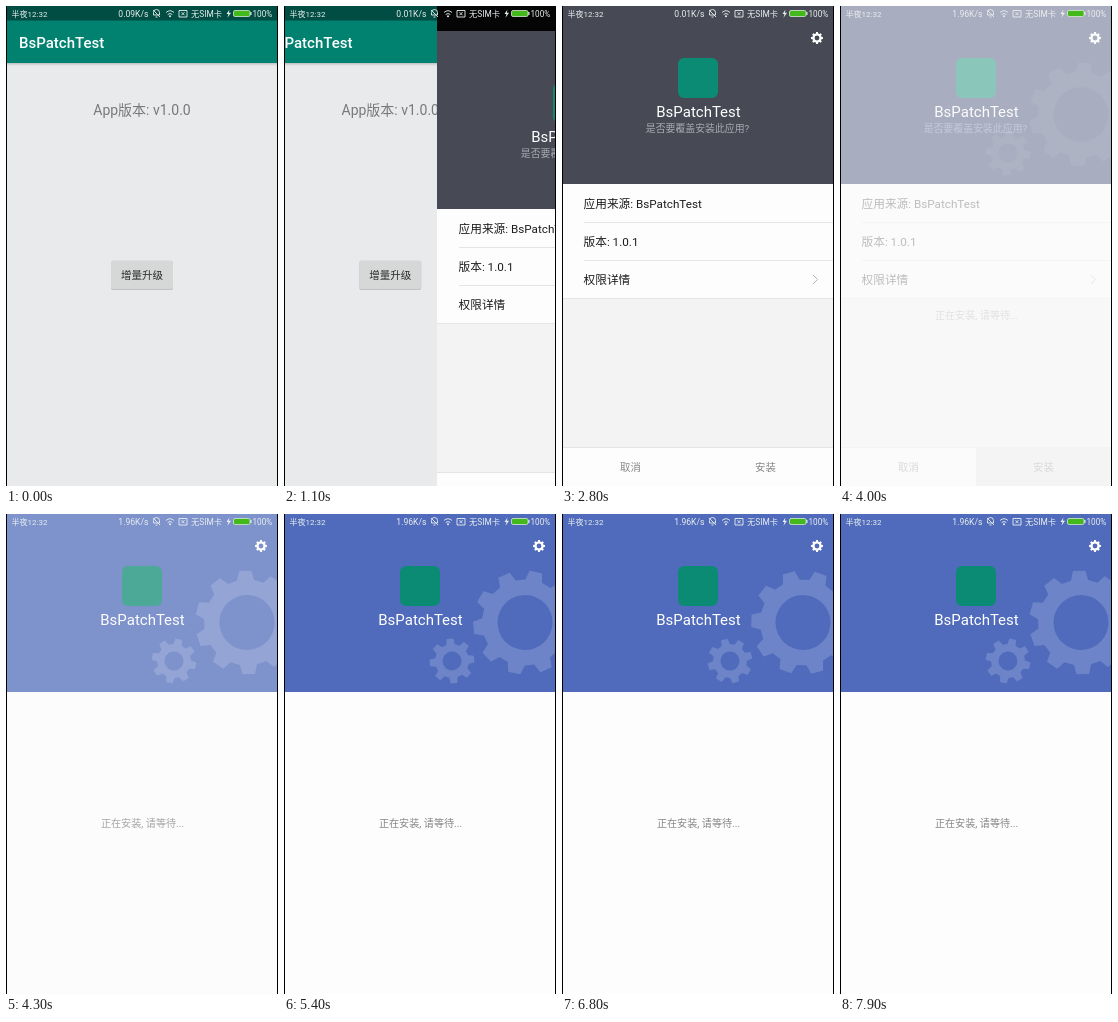
Animation, 272 px wide and 480 px high, one loop 8 s. Source, as an HTML page:

```html
<!DOCTYPE html>
<html lang="zh-CN">
<meta charset="utf-8">
<title>BsPatchTest</title>
<style>
  html, body { margin: 0; height: 100%; overflow: hidden; background: #000; }
  svg { display: block; width: 272px; height: 480px; font-family: Roboto, "Noto Sans CJK SC", sans-serif; }
  .mid { text-anchor: middle; }
</style>
<svg viewBox="0 0 272 480">
  <defs>
    <linearGradient id="shade" x2="0" y2="1">
      <stop stop-color="#aeb2b3"/><stop offset="1" stop-color="#e9eaec"/>
    </linearGradient>
    <clipPath id="buttonClip"><rect x="105" y="254.500" width="62" height="28.500" rx="2"/></clipPath>
    <g id="brand">
      <rect x="116" y="52" width="40" height="40" rx="6" fill="#0b8b74"/>
      <text class="mid" x="136.500" y="110.500" font-size="15" fill="#fff">BsPatchTest</text>
      <path id="cog" transform="translate(255 32)" fill="#fff" fill-rule="evenodd"/>
    </g>
  </defs>

  <g id="home">
    <rect width="272" height="480" fill="#e9eaec"/>
    <rect y="56" width="272" height="4" fill="url(#shade)"/>
    <rect width="272" height="57" fill="#018270"/>
    <rect width="272" height="14.500" fill="#014d43"/>
    <text x="13" y="42" font-size="15" font-weight="500" fill="#fff">BsPatchTest</text>
    <text class="mid" x="136" y="109" font-size="14" fill="#77797b">App版本: v1.0.0</text>
    <rect x="105" y="255.500" width="62" height="28.500" rx="2" fill="#bfc0c1"/>
    <rect x="105" y="254.500" width="62" height="28.500" rx="2" fill="#d6d7d7"/>
    <circle id="ripple" cx="136" cy="269" clip-path="url(#buttonClip)"/>
    <text class="mid" x="136" y="272.500" font-size="10.500" font-weight="500" fill="#28292a">增量升级</text>
  </g>

  <g id="confirm">
    <rect y="-25" width="272" height="25" fill="#050506"/>
    <rect width="272" height="480" fill="#f3f3f3"/>
    <rect width="272" height="178" fill="#474a55"/>
    <use href="#brand"/>
    <text class="mid" x="135.500" y="125.500" font-size="9.900" fill="#a9abb1">是否要覆盖安装此应用?</text>
    <rect y="178" width="272" height="114" fill="#fdfdfd"/>
    <path d="M22 216.500H272M22 254.500H272M0 292.500H272M0 441.500H272" stroke="#e5e5e5"/>
    <g font-size="11.700" fill="#1c1c1c">
      <text x="21.500" y="201.500">应用来源: BsPatchTest</text>
      <text x="21.500" y="239.500">版本: 1.0.1</text>
      <text x="21.500" y="277.500">权限详情</text>
    </g>
    <path d="M251 269l4.500 4.500-4.500 4.500" fill="none" stroke="#b5b5b5"/>
    <rect y="442" width="272" height="38" fill="#fdfdfd"/>
    <rect id="press" x="136" y="442" width="136" height="38" fill="#e4e4e4"/>
    <g class="mid" font-size="10.400" fill="#858585">
      <text x="68.500" y="464.500">取消</text>
      <text x="203.500" y="464.500">安装</text>
    </g>
  </g>

  <g id="install">
    <rect width="272" height="480" fill="#fdfdfd"/>
    <rect width="272" height="178" fill="#506bbb"/>
    <g fill="#6d85c8" fill-rule="evenodd">
      <path id="big"/>
      <path id="small"/>
    </g>
    <use href="#brand"/>
    <text class="mid" x="136.500" y="313" font-size="10.100" fill="#858585">正在安装, 请等待...</text>
  </g>

  <g fill="#e8eeee" font-size="8.300">
    <text x="5.500" y="10.700" font-size="8">半夜12:32</text>
    <text id="speed" x="142.500" y="10.700" font-size="8.600" text-anchor="end"></text>
    <g fill="none" stroke="#e8eeee" stroke-width=".9">
      <path d="M147.500 9V6.500a3 3 0 0 1 6 0V9zM149.500 11h2M147 4l7 7"/>
      <path d="M160 6.500q4-3.600 8 0M161.700 8.500q2.300-2 4.600 0"/>
      <path d="M173 4.500h8v6.500h-8zM175.500 6.200l3 3m0-3l-3 3"/>
    </g>
    <circle cx="164" cy="10.300" r="1"/>
    <text x="185" y="10.700">无SIM卡</text>
    <path d="M223.500 3.500l-3 4.500h2l-1 3.800 3.500-5h-2.200z"/>
    <rect x="227.500" y="4.500" width="16.500" height="6" rx="1.500" fill="#43b91c" stroke="#d5e8d5" stroke-width=".8"/>
    <rect x="244.300" y="6" width="1.200" height="3"/>
    <text x="246.500" y="10.700" font-size="8.200">100%</text>
  </g>
  <path d="M.5 0V480M271.500 0V480" stroke="#000"/>
</svg>
<script>
const $ = id => document.getElementById(id);
const set = (id, attrs) => Object.entries(attrs).forEach(([k, v]) => $(id).setAttribute(k, v));
const ramp = (t, from, to) => Math.min(1, Math.max(0, (t - from) / (to - from)));

function gearPath(teeth, outer, root, hole) {
  const step = 2 * Math.PI / teeth, pts = [];
  for (let i = 0; i < teeth; i++)
    for (const [offset, r] of [[-.32, root], [-.19, outer], [.19, outer], [.32, root]]) {
      const a = (i + offset) * step;
      pts.push((r * Math.cos(a)).toFixed(2) + ' ' + (r * Math.sin(a)).toFixed(2));
    }
  return `M${pts.join('L')}ZM${hole} 0A${hole} ${hole} 0 1 0 ${-hole} 0A${hole} ${hole} 0 1 0 ${hole} 0Z`;
}

set('cog', { d: gearPath(8, 6, 4.6, 2.4) });
set('big', { d: gearPath(10, 52, 43, 27.5) });
set('small', { d: gearPath(8, 22.5, 17, 9.5) });

function draw(t) {
  // button ripple
  const tap = ramp(t, 300, 700);
  set('ripple', { r: 36 * tap, 'fill-opacity': .14 * (1 - ramp(t, 700, 1000)) });

  // confirmation page slides in below the status bar, then goes full screen
  const slide = (1 - ramp(t, 1000, 1400)) ** 2;
  set('home', { transform: `translate(${-68 * (1 - slide)} 0)`, visibility: t < 1400 ? 'visible' : 'hidden' });
  set('confirm', {
    transform: `translate(${272 * slide} ${t < 1500 ? 25 : 0})`,
    opacity: 1 - ramp(t, 3800, 4100),
    visibility: t >= 1100 && t < 4100 ? 'visible' : 'hidden'
  });
  set('press', { opacity: t >= 3800 ? 1 : 0 });

  // installing page fades in over white
  set('install', { opacity: ramp(t, 3900, 4450) });
  document.body.style.background = t < 3800 ? '#000' : '#fafafa';
  const turn = (t - 3800) * .02;
  set('big', { transform: `translate(241 108.5) rotate(${-turn - 10})` });
  set('small', { transform: `translate(168 147) rotate(${turn * 1.25})` });

  $('speed').textContent = (t < 1100 ? '0.09' : t < 4000 ? '0.01' : '1.96') + 'K/s';
}

const start = performance.now();
function tick() {
  const t = (performance.now() - start) % 8000;
  draw(Math.floor(t / 100) * 100);
  requestAnimationFrame(tick);
}
tick();
</script>
</html>
```
